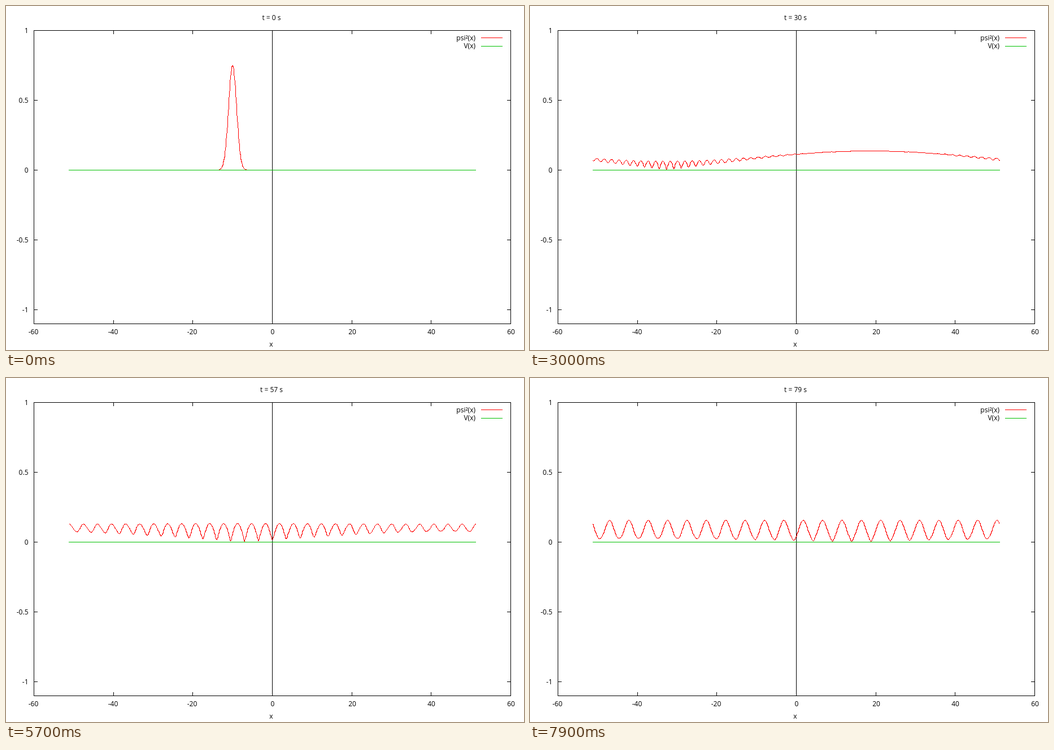
An HTML page for the animation above (8 s loop, 917x611 px).

```html
<!DOCTYPE html>
<html lang="en">
<head>
<meta charset="utf-8">
<title>Spreading wave packet</title>
<style>
  html, body { margin: 0; width: 100%; height: 100%; overflow: hidden; background: #fff; }
  svg { display: block; width: 917px; height: 611px; }
  text { font: 12px "Open Sans", "Noto Sans", sans-serif; fill: #000; }
  path { fill: none; stroke-width: 1; shape-rendering: crispEdges; }
</style>
</head>
<body>
<svg id="plot" viewBox="0 0 917 611"></svg>
<script>
const svg = document.getElementById('plot');
const LEFT = 49.5, RIGHT = 893.5, TOP = 43.5, BOTTOM = 564.5;
const RED = '#ff0000', GREEN = '#00c000', BLACK = '#000';
const FRAME_MS = 100, FRAMES = 80;

const px = x => 471.5 + x * 422 / 60;
const py = y => 291.5 - y * 248;
const snap = v => Math.floor(v) + 0.5;

function add(tag, attrs, text = '') {
  const node = document.createElementNS('http://www.w3.org/2000/svg', tag);
  for (const key in attrs) node.setAttribute(key, attrs[key]);
  node.textContent = text;
  svg.appendChild(node);
  return node;
}
const line = (d, stroke) => add('path', { d, stroke });
const label = (text, x, y, anchor) => add('text', { x, y, 'text-anchor': anchor }, text);

// Axes
let axes = `M${LEFT} ${TOP}H${RIGHT}V${BOTTOM}H${LEFT}ZM471.5 ${TOP}V${BOTTOM}`;
for (let x = -60; x <= 60; x += 20) {
  const tick = snap(px(x));
  axes += `M${tick} ${TOP}v6.5M${tick} ${BOTTOM}v-6.5`;
  label(x, x < 0 ? tick - 1 : tick + 0.5, 583, 'middle');
}
for (let y = -1; y <= 1; y += 0.5) {
  axes += `M${LEFT} ${py(y)}h6.5M${RIGHT} ${py(y)}h-6.5`;
  label(y, 39.5, py(y) + 4.5, 'end');
}
line(axes, BLACK);
label('x', 469.3, 605, 'middle');
const title = label('', 470, 25, 'middle');

// Legend
label('psi²(x)', 831, 60.5, 'end');
label('V(x)', 831, 75, 'end');
line('M841 56.5H879', RED);
line('M841 71.5H879', GREEN);

// Curves
const LENGTH = 102.4, POINTS = 1024, START = -10;
const MOMENTUM = 31 * Math.PI / LENGTH;
const curve = line('', RED);
line(`M111 ${py(0)}H832`, GREEN);

// Modulus of a free Gaussian packet summed over its periodic images
function modulus(x, t) {
  const spread = 1 + t * t;
  const offset = x - START - MOMENTUM * t;
  let re = 0, im = 0;
  for (let n = -6; n <= 6; n++) {
    const u = offset + n * LENGTH;
    const size = Math.exp(-u * u / (2 * spread));
    const phase = u * u * t / (2 * spread) + MOMENTUM * n * LENGTH;
    re += size * Math.cos(phase);
    im += size * Math.sin(phase);
  }
  return Math.hypot(re, im) / Math.pow(Math.PI * spread, 0.25);
}

function draw(t) {
  const points = [];
  for (let i = 0; i <= POINTS; i++) {
    const x = (i / POINTS - 0.5) * LENGTH;
    points.push(snap(px(x)) + ' ' + snap(py(modulus(x, t))));
  }
  curve.setAttribute('d', 'M' + points.join('L'));
  title.textContent = `t = ${t} s`;
}

let shown = -1;
const begin = performance.now();
function update() {
  const t = Math.floor((performance.now() - begin) / FRAME_MS) % FRAMES;
  if (t !== shown) draw(shown = t);
  requestAnimationFrame(update);
}
update();
</script>
</body>
</html>
```
